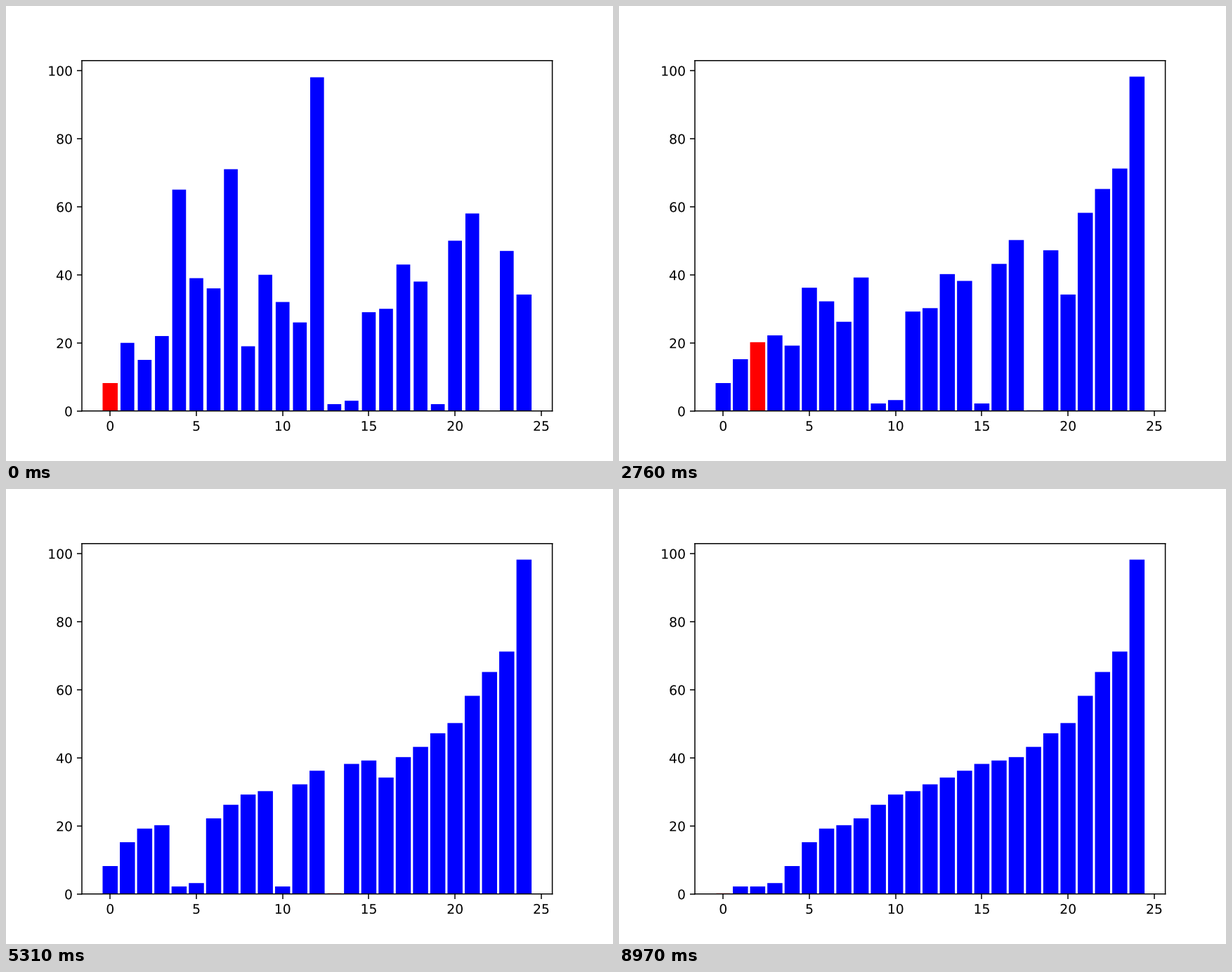
Recreate the animation shown at these times as a matplotlib script. Size 864 by 648 pixels, loop 9000 ms.

```python
import matplotlib.pyplot as plt
from matplotlib.animation import FuncAnimation
from matplotlib.patheffects import Normal

# place edges and glyphs at sub-pixel positions
plt.rcParams["path.snap"] = False

VALUES = [8, 20, 15, 22, 65, 39, 36, 71, 19, 40, 32, 26, 98,
          2, 3, 29, 30, 43, 38, 2, 50, 58, 0, 47, 34]
N = len(VALUES)


def bubble_steps(values):
    """Return (cursor, heights) after every comparison of a bubble sort."""
    a = list(values)
    steps = []
    for end in range(N - 1, 0, -1):
        for j in range(end):
            if a[j] > a[j + 1]:
                a[j], a[j + 1] = a[j + 1], a[j]
            steps.append((j, a[:]))
    return steps


STEPS = bubble_steps(VALUES)

fig, ax = plt.subplots(figsize=(6.4, 4.8), dpi=135)
bars = ax.bar(range(N), VALUES, color="blue")
ax.set_xlim(ax.get_xlim())
ax.set_ylim(ax.get_ylim())
for label in ax.get_xticklabels() + ax.get_yticklabels():
    label.set_path_effects([Normal()])


def update(i):
    cursor, heights = STEPS[i]
    for k, (bar, h) in enumerate(zip(bars, heights)):
        color = "red" if k == cursor else "blue"
        # bars gain an outline once the cursor has reached them
        outlined = k <= i or k == N - 1
        bar.set_height(h)
        bar.set_facecolor(color)
        bar.set_edgecolor(color if outlined else "none")
    return bars


anim = FuncAnimation(fig, update, frames=len(STEPS), init_func=lambda: update(0),
                     interval=30, repeat=True, repeat_delay=0)
plt.show()
```
